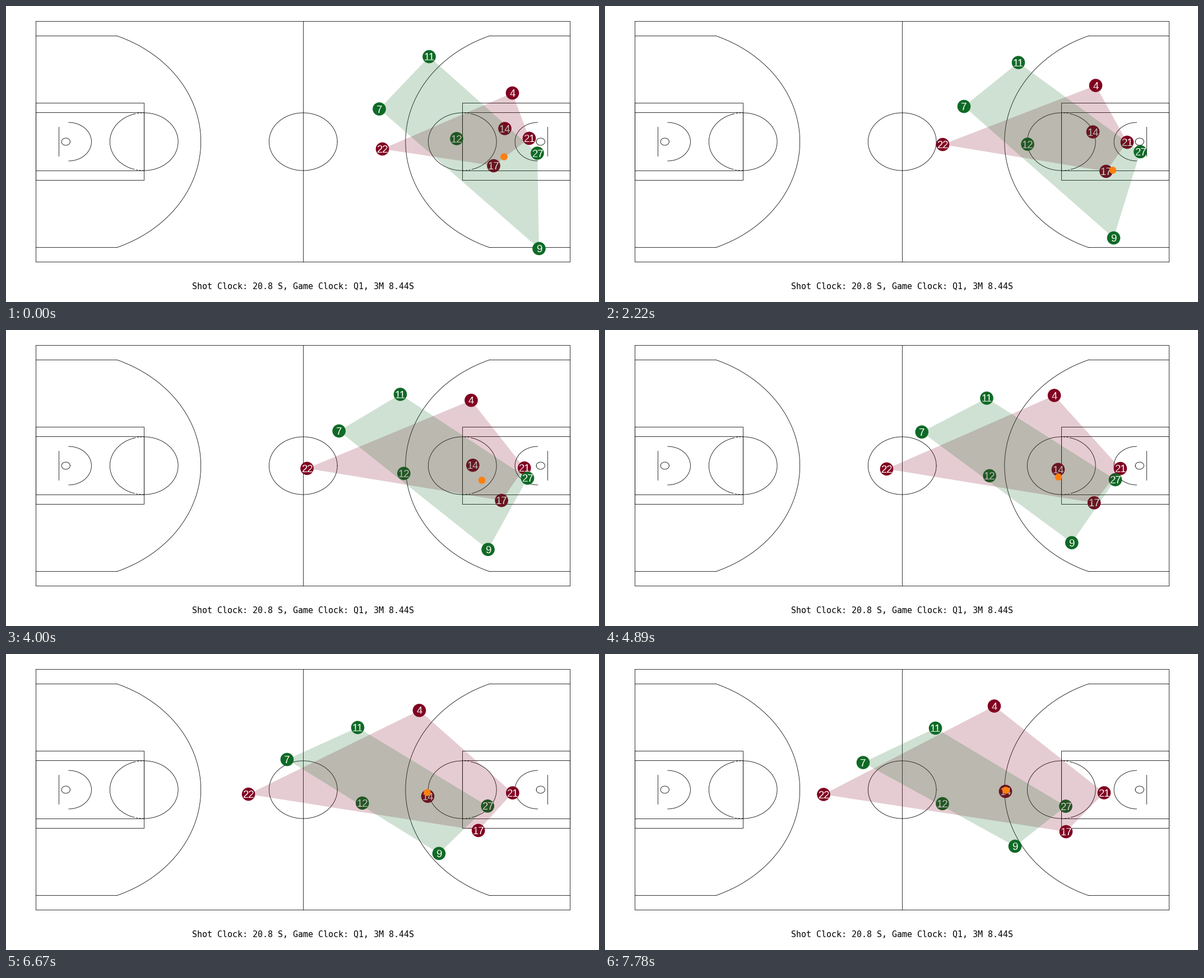
These frames come from a looping animation (1058 px wide and 529 px high, 8 s). A matplotlib script:

```python
import numpy as np
import matplotlib.pyplot as plt
from matplotlib.animation import FuncAnimation
from matplotlib.patches import Circle, Polygon

W, H, DPI = 1058, 529, 64
FRAMES, LOOP_MS = 200, 8000
STEPS = 36  # poses in one loop
PX = 72 / DPI  # points per pixel

RED = (128 / 255, 0, 32 / 255)
GREEN = (15 / 255, 106 / 255, 38 / 255)
ORANGE = "#ff7f0e"

# Court size in feet, stage place in pixels
LENGTH, WIDTH = 94, 50
LEFT, TOP = 53, 27
SX, SY = 953.5 / LENGTH, 430 / WIDTH

# Each player follows a cubic through four key points
KEYS = (0, 10, 26, 35)
RED_TEAM = {
    "4": [(903, 155), (875, 141.5), (770, 108), (694, 92.5)],
    "22": [(671, 255), (602, 247), (467, 249), (389.5, 250.5)],
    "17": [(869.5, 285), (893.5, 295), (858, 312), (822, 317)],
    "21": [(933, 236), (931, 243), (912, 247.5), (890, 247.5)],
    "14": [(889.5, 218.5), (870, 224.5), (781, 253.5), (714, 245)],
}
GREEN_TEAM = {
    "11": [(754.5, 90), (737, 100.5), (655, 127), (589, 132)],
    "7": [(665.5, 183.5), (640, 179), (533.5, 184.5), (460, 193.5)],
    "9": [(950.5, 433), (907, 414), (803, 367.5), (731, 343)],
    "27": [(947.5, 262.5), (954.5, 260), (886, 269.5), (821.5, 271.5)],
    "12": [(803.5, 236.5), (753.5, 246.5), (661, 263.5), (601.5, 267)],
}
# The ball goes straight between bounces: step, x, y
BALL = [(0, 888, 269), (5, 885, 280), (10, 905.5, 293), (18, 848.5, 268),
        (26, 768.5, 256.5), (30, 751, 247), (35, 714.5, 243)]


def cubic_path(points):
    curve = np.polyfit(KEYS, points, 3)
    return np.vander(np.arange(STEPS), 4) @ curve


def straight_path(points):
    t, x, y = zip(*points)
    steps = np.arange(STEPS)
    return np.column_stack([np.interp(steps, t, x), np.interp(steps, t, y)])


fig = plt.figure(figsize=(W / DPI, H / DPI), dpi=DPI, facecolor="white")
ax = fig.add_axes([0, 0, 1, 1])
ax.set_xlim(-0.5, W - 0.5)
ax.set_ylim(H - 0.5, -0.5)
ax.axis("off")


def draw(xs, ys, flip=False, crisp=False, **style):
    """Polyline in court feet, mirrored for the right half."""
    xs, ys = np.array(xs, float), np.array(ys, float)
    px = LEFT + SX * (LENGTH - xs if flip else xs)
    py = TOP + SY * ys
    if crisp:
        px, py = np.round(px), np.round(py)
    ax.plot(px, py, color="black", lw=0.8 * PX, snap=False, zorder=1, **style)


def line(x0, y0, x1, y1, flip=False):
    draw([x0, x1], [y0, y1], flip, crisp=True)


def box(x0, y0, x1, y1, flip=False):
    draw([x0, x1, x1, x0, x0], [y0, y0, y1, y1, y0], flip, crisp=True,
         solid_joinstyle="miter")


def arc(x, r, start, end, flip=False, **style):
    """Arc around the court's long axis; 0 degrees points to midcourt."""
    a = np.radians(np.linspace(start, end, 120))
    draw(x + r * np.cos(a), WIDTH / 2 + r * np.sin(a), flip, **style)


def half_court(flip):
    box(0, 17, 19, 33, flip)
    box(0, 19, 19, 31, flip)
    arc(19, 6, -90, 90, flip)
    arc(19, 6, 107, 253, flip)
    for start in (90, 253):
        arc(19, 6, start, start + 17, flip, dashes=(4, 3))
    edge = np.degrees(np.arcsin(22 / 23.75))
    arc(5.25, 23.75, -edge, edge, flip)
    corner = 5.25 + np.sqrt(23.75**2 - 22**2)
    for y in (3, WIDTH - 3):
        line(0, y, corner, y, flip)
    arc(5.75, 4, -90, 90, flip)
    arc(5.25, 0.75, 0, 360, flip)
    line(4, 22, 4, 28, flip)


box(0, 0, LENGTH, WIDTH)
line(LENGTH / 2, 0, LENGTH / 2, WIDTH)
arc(LENGTH / 2, 6, 0, 360)
half_court(False)
half_court(True)

ax.text(530, 505, "Shot Clock: 20.8 S, Game Clock: Q1, 3M 8.44S", ha="center",
        va="baseline", family="DejaVu Sans Mono", size=15 * PX, color="black")


class Team:
    def __init__(self, players, color, z):
        self.paths = [cubic_path(p) for p in players.values()]
        self.discs = [ax.add_patch(Circle((0, 0), 11.8, fc=color, lw=0, zorder=z))
                      for _ in players]
        self.labels = [ax.text(0, 0, name, color="white", ha="center",
                               va="baseline", family="Liberation Sans",
                               size=18.67 * PX, zorder=5) for name in players]
        self.area = ax.add_patch(Polygon(np.zeros((4, 2)), fc=color, alpha=0.2,
                                         lw=0, zorder=z + 4))

    def move(self, step):
        spots = [p[step] for p in self.paths]
        for (x, y), disc, label in zip(spots, self.discs, self.labels):
            disc.center = x, y
            label.set_position((x, y + 6.6))
        # The last player of each team stays inside the area
        self.area.set_xy(spots[:4])


teams = [Team(RED_TEAM, RED, 3), Team(GREEN_TEAM, GREEN, 4)]
ball_path = straight_path(BALL)
ball = ax.add_patch(Circle((0, 0), 6.3, fc=ORANGE, lw=0, zorder=10))


def update(i):
    # Poses hold still and jump at even times
    step = min((i + 1) * STEPS // FRAMES, STEPS - 1)
    for team in teams:
        team.move(step)
    ball.center = tuple(ball_path[step])
    return []


anim = FuncAnimation(fig, update, frames=FRAMES, interval=LOOP_MS // FRAMES,
                     init_func=lambda: update(0), repeat=True, repeat_delay=0)
plt.show()
```
